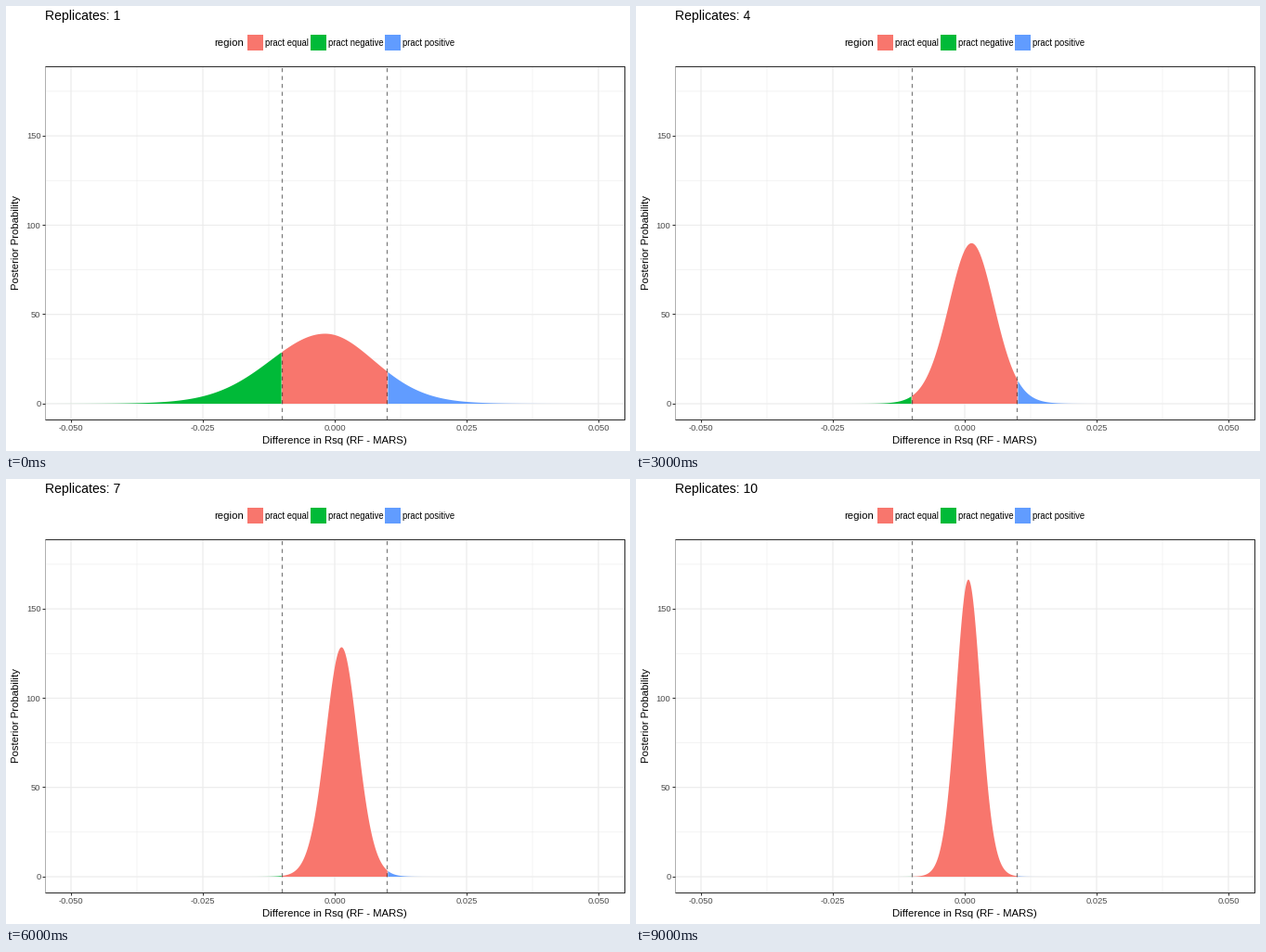
These frames come from a looping animation (672x480 px, 10 s). A matplotlib script:

```python
import numpy as np
import matplotlib.pyplot as plt
from matplotlib.animation import FuncAnimation
from matplotlib.patches import Polygon, Rectangle

W, H, DPI = 672, 480, 96
PT = 72 / DPI                # points per pixel
X0, Y0 = 354, 429            # pixel position of the data origin
SX, SY = 5680, 1.926         # pixels per data unit
LEFT, RIGHT, TOP, BOTTOM = 42, 666.5, 65.7, 446.2
LIMIT = 0.01                 # practical equivalence limit
RED, GREEN, BLUE = "#F8766D", "#00BA38", "#619CFF"
GRID, AXIS, TICK_TEXT = "#EBEBEB", "#333333", "#4D4D4D"

# Mode and peak height of the posterior at some replicate counts
REPS = [1, 2, 3, 4, 6, 8, 10]
MODE = [-0.0018, -0.0033, 0.0025, 0.0013, 0.0018, 0.0008, 0.0007]
PEAK = [39.2, 62.8, 72, 89.9, 114.8, 142.2, 166.4]
DOF = 25

plt.rcParams["font.family"] = "Liberation Sans"


def px(x):
    return X0 + SX * x


def py(y):
    return Y0 - SY * y


def density(x, rep):
    """Student t curve of unit area, slightly skewed when replicates are few."""
    mode = np.interp(rep, REPS, MODE)
    peak = np.interp(rep, REPS, PEAK)
    skew = 0.06 / rep ** 2
    scale = 0.395 / peak * np.where(x < mode, 1 + skew, 1 - skew)
    z = (x - mode) / scale
    return peak * (1 + z * z / DOF) ** (-(DOF + 1) / 2)


fig = plt.figure(figsize=(W / DPI, H / DPI), dpi=DPI, facecolor="white")
ax = fig.add_axes([0, 0, 1, 1])
ax.set_xlim(0, W)
ax.set_ylim(H, 0)
ax.axis("off")


def line(xs, ys, color, width, snap=True, **kw):
    # Snapping rounds up half a pixel, so step back to stay in the same pixel
    back = 0.5 if snap else 0
    ax.plot(np.array(xs) - back, np.array(ys) - back, color=color,
            lw=width * PT, snap=snap, solid_capstyle="butt",
            dash_capstyle="butt", **kw)


def text(x, y, s, size, color="black", **kw):
    return ax.text(x, y, s, fontsize=size * PT, color=color, **kw)


def grid_x(v, width):
    line([px(v)] * 2, [TOP, BOTTOM], GRID, width, snap=False, zorder=1)


def grid_y(v, width):
    line([LEFT, RIGHT], [py(v)] * 2, GRID, width, snap=False, zorder=1)


for k in range(4):
    grid_x(-0.0375 + 0.025 * k, 0.55)
    grid_y(25 + 50 * k, 0.55)

for k in range(-2, 3):
    v = 0.025 * k
    grid_x(v, 1.1)
    line([px(v)] * 2, [BOTTOM, BOTTOM + 3], AXIS, 1.1, zorder=5)
    text(px(v), 458, f"{v:.3f}", 9.3, TICK_TEXT, ha="center")

for v in range(0, 151, 50):
    grid_y(v, 1.1)
    line([LEFT - 3, LEFT], [py(v)] * 2, AXIS, 1.1, zorder=5)
    text(37.5, py(v) + 3.3, str(v), 9.3, TICK_TEXT, ha="right")

# Panel border, with a fainter left edge
line([LEFT, RIGHT, RIGHT, LEFT], [TOP, TOP, BOTTOM, BOTTOM], AXIS, 1.1, zorder=5)
line([LEFT, LEFT], [TOP, BOTTOM], "#B0B0B0", 1, zorder=4)

for v in (-LIMIT, LIMIT):
    line([px(v)] * 2, [BOTTOM, TOP], "black", 1.3, alpha=0.5, zorder=4,
         linestyle=(0, (3.28, 3.28)))

text(354, 472, "Difference in Rsq (RF - MARS)", 11.35, ha="center")
text(15.8, 254.5, "Posterior Probability", 11.4, ha="right", va="center",
     rotation=90)
text(224.5, 43.3, "region", 11.4)
for x, label, color in ((260, "equal", RED), (328, "negative", GREEN),
                        (408, "positive", BLUE)):
    ax.add_patch(Rectangle((x, 31), 17, 17, fc=color, ec="none"))
    text(x + 19.3, 43, "pract " + label, 9.5)

title = text(42, 15, "", 14)

regions = []
for start, end, color in ((-0.055, -LIMIT - 0.0001, GREEN),
                          (-LIMIT, LIMIT, RED),
                          (LIMIT + 0.0001, 0.055, BLUE)):
    patch = ax.add_patch(Polygon([[0, 0]] * 3, fc=color, ec="none", zorder=3))
    regions.append((patch, np.linspace(start, end, 300)))


def update(i):
    rep = i + 1
    title.set_text(f"Replicates: {rep}")
    for patch, x in regions:
        xs = px(np.r_[x[0], x, x[-1]])
        ys = py(np.r_[0, density(x, rep), 0])
        patch.set_xy(np.column_stack([xs, ys]))
    return [title] + [patch for patch, _ in regions]


anim = FuncAnimation(fig, update, frames=10, interval=1000, repeat=True,
                     repeat_delay=0, init_func=lambda: update(0), blit=False)
plt.show()
```
